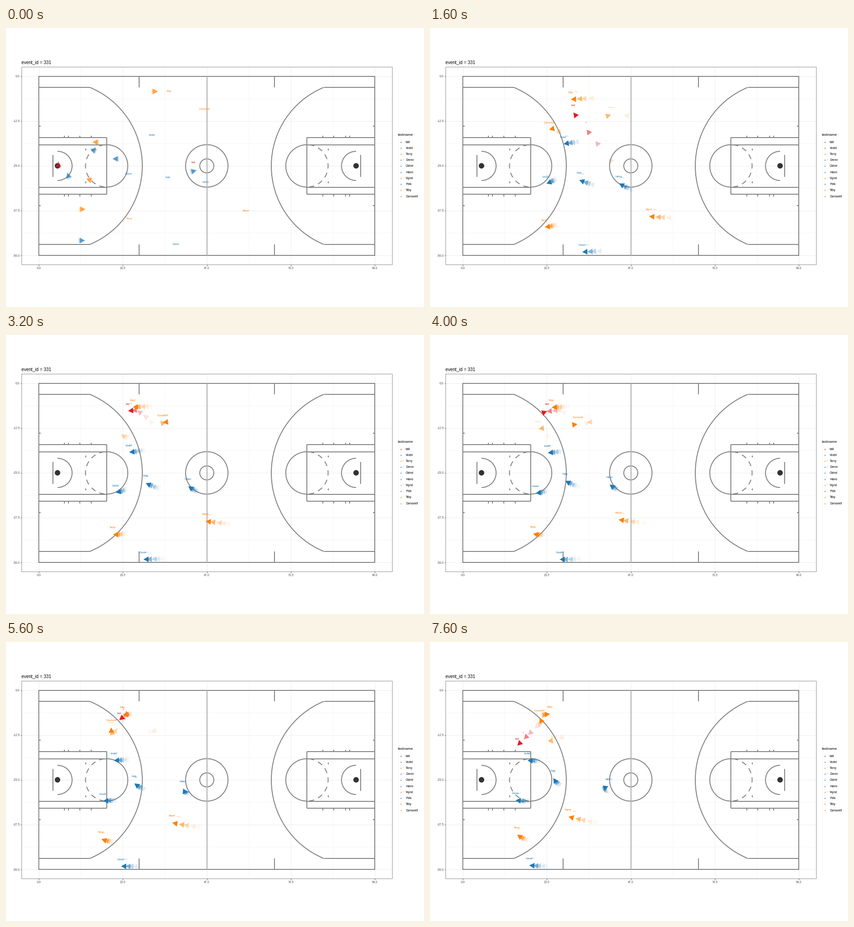
Write a matplotlib script that moves like this. It is 917 px wide and 611 px high and loops after 8000 ms.

```python
import numpy as np
import matplotlib.pyplot as plt
from matplotlib.animation import FuncAnimation
from matplotlib.patches import Arc, Circle, Polygon, Rectangle

W, H, DPI = 917, 611, 64
PT = 72 / DPI                      # points per pixel
FRAMES, INTERVAL = 20, 400
SAMPLES_PER_FRAME, LAST_SAMPLE = 2.4, 46
plt.rcParams["font.family"] = "Liberation Sans"

RED, BLUE, ORANGE = "#E31A1C", "#1F78B4", "#FF7F00"
COURT, DARK = "#7f7f7f", "#333333"
FADE = [1, .55, .30, .13, .05]     # opacity by age in frames
SHRINK = [1, .55, .30, .15]        # label size by age
LABEL_SIZE, LABEL_LIFT = 5.7, 15.5

COLORS = {"ball": RED, "Vodel": BLUE, "Tarvy": ORANGE, "Drenn": BLUE,
          "Ostrel": BLUE, "Halvo": BLUE, "Wynd": ORANGE, "Pelk": BLUE,
          "Tilby": ORANGE, "Dunswell": ORANGE}

# Label position at the start, halfway and at the end
RUNS = {
    "Vodel": [(320, 234), (260, 242.5), (213, 244)],
    "Tarvy": [(271, 417), (227, 420.5), (190.5, 406)],
    "Drenn": [(269, 319), (233, 331), (187, 331)],
    "Ostrel": [(372, 473), (287, 476), (217, 473.5)],
    "Halvo": [(438, 337), (394.5, 312), (392, 300)],
    "Wynd": [(526, 400), (418, 389.5), (303, 367)],
    "Pelk": [(355, 327), (298, 304.5), (270, 282)],
    "Tilby": [(358, 138), (268, 143), (264, 142)],
    "Dunswell": [(435, 177), (328, 179), (265, 214)],
}
# A second player with the same surname; the marker hops between the two
NAMESAKE = [(292, 220), (236.5, 188.5), (240, 150)]
HOPS = "AABABBBAABAABBBAABAB"

# The ball flies straight between (sample, x, y) touches
BALL = np.array([(0, 411, 294), (10, 314, 169), (14, 287, 149), (22, 255, 152),
                 (24, 257.5, 151), (29, 265, 142), (34, 248, 156), (46, 191, 212)])

# Wake left over from before the loop: marker centre and heading in degrees
LEFTOVER = {
    "Tilby": (328, 139, 0), "Dunswell": (195, 250, 180), "Vodel": (190, 267, 155),
    "Drenn": (239, 286.5, 180), "Pelk": (136, 322, 110), "ball": (115, 298, 90),
    "Wynd": (184, 335, -75), "Tarvy": (169, 397, 0), "Ostrel": (168, 465.5, 0),
    "Halvo": (413, 313, 15),
}


def run(points, u):
    """Parabola through three points at u = 0, 1/2 and 1."""
    a, b, c = np.array(points, float)
    return a * (1 - u) * (1 - 2*u) + 4*b * u * (1 - u) + c * u * (2*u - 1)


def label_pos(name, frame):
    sample = round(SAMPLES_PER_FRAME * frame)
    if name == "ball":
        return np.array([np.interp(sample, BALL[:, 0], BALL[:, k]) for k in (1, 2)])
    hopped = name == "Dunswell" and HOPS[frame] == "B"
    return run(NAMESAKE if hopped else RUNS[name], sample / LAST_SAMPLE)


fig = plt.figure(figsize=(W / DPI, H / DPI), dpi=DPI, facecolor="white")
ax = fig.add_axes([0, 0, 1, 1])
ax.set_xlim(0, W)
ax.set_ylim(H, 0)
ax.axis("off")


def line(x0, y0, x1, y1, color=COURT, width=1.9, z=2):
    ax.plot([x0, x1], [y0, y1], color=color, lw=width * PT, zorder=z,
            solid_capstyle="butt")


def write(x, y, text, size, color="black", ha="left", **kw):
    """Text whose capitals are centred on y."""
    return ax.text(x, y + .36 * size, text, size=size * PT, color=color,
                   ha=ha, va="baseline", **kw)


def arc(x, y, r, mid, spread):
    ax.add_patch(Arc((x, y), 2 * r, 2 * r, theta1=mid - spread, theta2=mid + spread,
                     color=COURT, lw=1.9 * PT, zorder=2, capstyle="butt"))


def box(x0, y0, x1, y1, color, width, z):
    ax.add_patch(Rectangle((x0, y0), x1 - x0, y1 - y0, fill=False, ec=color,
                           lw=width * PT, zorder=z))


def draw_axes():
    left, top, right, bottom = 34, 85.3, 847, 518.2
    for k in range(9):
        x, y, width = 72 + 737 / 8 * k, 105.5 + 49.05 * k, .45 if k % 2 else .9
        line(x, top, x, bottom, "#ebebeb", width, 0)
        line(left, y, right, y, "#ebebeb", width, 0)
    for k in range(5):
        x, y = 72 + 184.25 * k, 105.5 + 98.1 * k
        line(x, bottom, x, bottom + 2.3, DARK, .8)
        line(left - 2.3, y, left, y, DARK, .8)
        write(x, 525.3, f"{23.5 * k:.1f}", 6.56, "#4d4d4d", "center")
        write(30, y + .3, f"{-12.5 * k if k else 0:.1f}", 6.56, "#4d4d4d", "right")
    box(left, top, right, bottom, DARK, .55, 3)
    write(33.8, 74.9, "event_id = 331", 9.85)


def draw_half(mirror):
    facing = 180 if mirror else 0

    def fx(x):
        return 881 - x if mirror else x

    def seg(x0, y0, x1, y1):
        line(fx(x0), y0, fx(x1), y1)

    for side in (-1, 1):
        def y(d):
            return 302 + side * d
        seg(72, y(172), 183.5, y(172))
        seg(72, y(62.3), 221.4, y(62.3))
        seg(72, y(46.5), 220.8, y(46.5))
        seg(292, y(172.3), 292, y(196.3))
        seg(72, y(86.8), 76, y(86.8))
        seg(174.5, y(34), 174.5, y(38))
        for x in (127.5, 136.5, 161.8, 186.5):
            seg(x, y(62.3), x, y(66.5))
    seg(220.8, 239.7, 220.8, 364.3)
    seg(102.7, 278, 102.7, 325.5)
    arc(fx(113), 302, 186, facing, np.degrees(np.arcsin(172 / 186)))
    arc(fx(113), 302, 32, facing, 90)
    arc(fx(220.8), 302, 46.4, facing, 90)
    for k in range(-3, 4):
        arc(fx(220.8), 302, 46.4, facing + 180 + 180 / 7 * k, 7)
    ax.add_patch(Circle((fx(113), 301.8), 6, fc=DARK, ec="none", zorder=2))


def draw_court():
    box(72, 105.5, 809, 498.1, COURT, 1.9, 2)
    draw_half(False)
    draw_half(True)
    for r in (46.5, 15.4):
        arc(440.5, 302, r, 0, 180)
    line(440.5, 105.5, 440.5, 498.1, "#b3b3b3", 2.2)


def draw_legend():
    write(859.7, 233.5, "lastname", 8.2)
    for k, (name, color) in enumerate(COLORS.items()):
        y = 249.2 + 13.22 * k
        write(866.5, y + .3, "a", LABEL_SIZE, color, "center")
        if name in ("Tarvy", "Drenn", "Wynd"):
            ax.add_patch(Circle((871.6, y - .3), .6, fc=color, ec="none"))
        write(877, y, name, 6.56)


artists = []


def marker(name, tip, heading, age):
    """Triangle trailing behind its tip."""
    side = 6.2 * np.array([-heading[1], heading[0]])
    base = tip - 12.1 * heading
    artists.append(ax.add_patch(Polygon(
        [tip - .8 * heading, base + side, base - side], fc=COLORS[name],
        ec="none", alpha=FADE[age], zorder=10 - age)))


def label(name, x, y, age):
    artists.append(write(x, y, name, LABEL_SIZE * SHRINK[age], COLORS[name],
                         "center", alpha=FADE[age], zorder=10 - age))


def draw_leftover(name, frame, age):
    x, y, degrees = LEFTOVER[name]
    angle = np.radians(degrees)
    heading = np.array([np.cos(angle), -np.sin(angle)])
    marker(name, np.array([x, y]) + (8 + 1.5 * frame) * heading, heading, age)


def draw(frame):
    while artists:
        artists.pop().remove()
    for age in reversed(range(len(FADE))):
        past = frame - age
        for name in COLORS:
            if past < 0:
                draw_leftover(name, past, age)
                continue
            here = label_pos(name, past)
            if past > 0:
                step = here - label_pos(name, past - 1)
                marker(name, here + [0, LABEL_LIFT], step / np.hypot(*step), age)
            if age < len(SHRINK):
                label(name, *here, age)
    return artists


draw_axes()
draw_court()
draw_legend()
anim = FuncAnimation(fig, draw, frames=FRAMES, interval=INTERVAL,
                     repeat=True, repeat_delay=0, blit=False)
plt.show()
```
